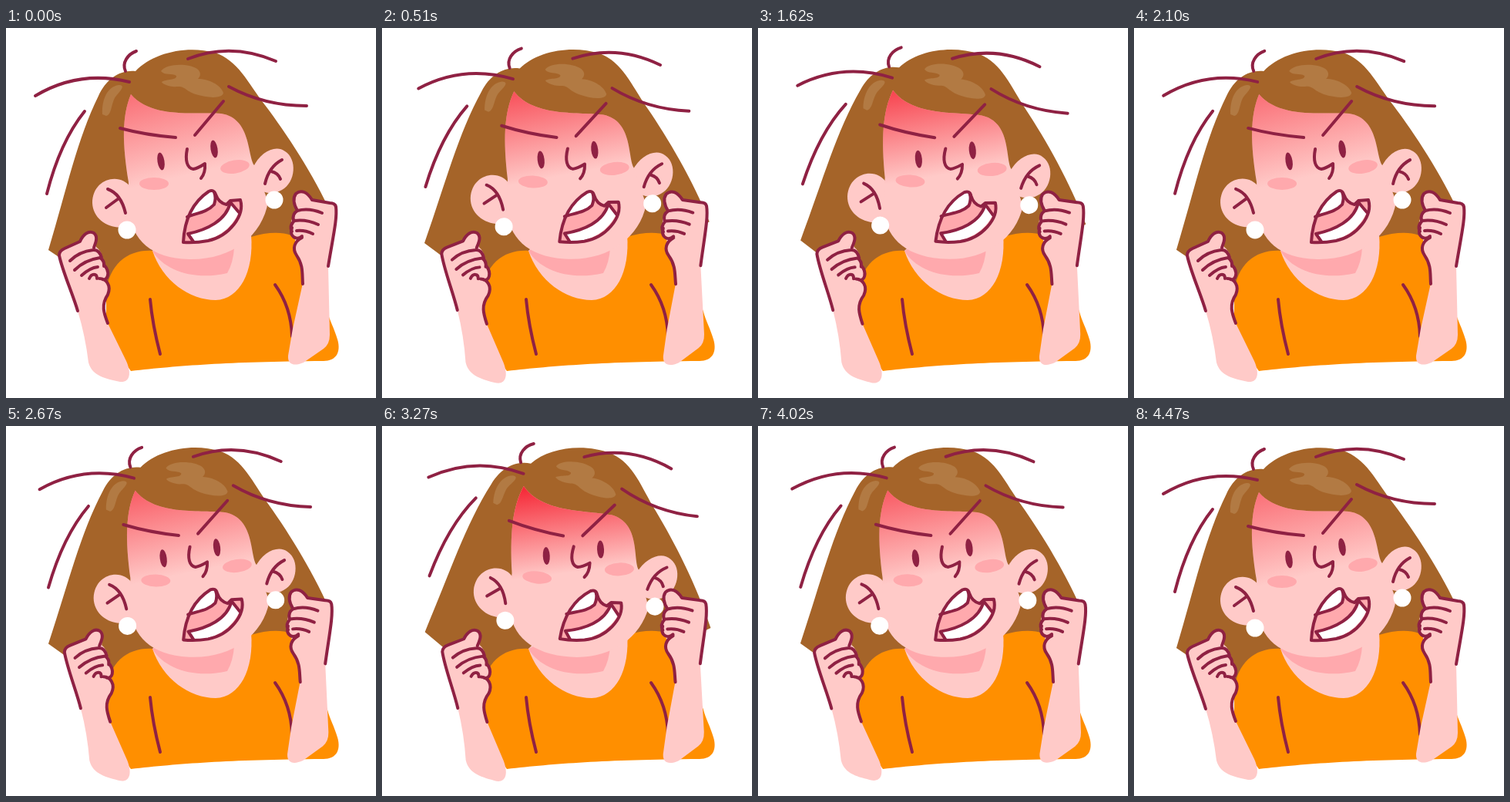
An HTML page that plays this animation: 480 px wide and 480 px high, repeating every 4500 ms.

```html
<!DOCTYPE html>
<html lang="en">
<head>
<meta charset="utf-8">
<title>Furious woman</title>
<style>
  html, body { margin: 0; width: 100%; height: 100%; overflow: hidden; background: #fff; }
  svg { display: block; width: 100%; height: 100%; }
  .line { fill: none; stroke: #8f2143; stroke-width: 4; stroke-linecap: round; stroke-linejoin: round; }
  .skin { fill: #ffcac8; }
  .hair { fill: #a56429; }
  .shine { fill: #b27a43; }
  .pink { fill: #ffa9ad; }
  .white { fill: #fff; }
  .shirt { fill: #ff8f00; }
  .eye { fill: #8f2143; }
</style>
</head>
<body>
<svg viewBox="0 0 480 480">
  <defs>
    <linearGradient id="heat" gradientUnits="userSpaceOnUse" x1="170" y1="87" x2="197" y2="200">
      <stop offset="0" stop-color="#f5202f"/>
      <stop offset="1" stop-color="#f5202f" stop-opacity="0"/>
    </linearGradient>
    <path id="face" d="M162 86C150 115 151 150 159 200V240C165 274 187 299 238 300C292 301 333 270 340 225L322 178C313 165 318 117 279 111C250 108 190 119 162 86Z"/>
    <path id="mouth" d="M230 278C231 258 236 230 263 212Q270 209 272 216Q276 227 286 229L291 224L304 223C310 243 290 270 262 276Q246 279 230 278Z"/>
  </defs>

  <g class="head">
    <path class="hair" d="M55 288C80 205 92 145 120 88C130 66 148 54 168 56C190 32 235 22 271 32C301 42 313 70 336 100C364 137 399 190 423 243L330 300L140 345Z"/>
    <path class="shine" d="M125 112C124 92 132 76 146 74C156 74 148 82 143 88C136 96 138 112 130 114ZM201 56C207 46 236 45 248 53C254 58 252 63 249 66C262 66 278 73 282 84C281 92 262 91 246 86C232 81 232 75 222 76C212 77 202 72 202 70C208 66 222 68 221 62C215 58 206 62 201 56Z"/>
  </g>

  <path class="shirt" d="M190 289C160 287 133 305 130 345V400L162 445C225 438 285 433 412 432C428 432 435 421 430 404C426 390 420 380 417 368L384 280C372 263 345 263 318 271Z"/>
  <path class="skin" d="M190 289C203 328 238 353 272 353C303 352 322 316 318 268L250 230Z"/>
  <path class="pink" d="M190 289C205 315 245 328 287 318Q295 304 296 285L230 270Z"/>
  <path class="line" d="M187 352Q190 385 200 423M349 333Q370 362 371 400"/>

  <g class="head">
    <path class="skin" d="M162 207C148 186 112 195 112 227C113 251 140 266 166 255ZM320 182C330 160 350 151 362 160C378 170 376 200 358 210C350 215 340 215 333 212Z"/>
    <use href="#face" class="skin"/>
    <use href="#face" id="flush" fill="url(#heat)"/>
    <g class="pink">
      <ellipse cx="192" cy="202" rx="19" ry="8"/>
      <ellipse cx="297" cy="180" rx="19" ry="8.5" transform="rotate(-9 297 180)"/>
    </g>
    <g class="eye">
      <ellipse cx="201" cy="173" rx="4.5" ry="11.5" transform="rotate(-9 201 173)"/>
      <ellipse cx="270" cy="157" rx="4.5" ry="11.5" transform="rotate(-9 270 157)"/>
    </g>
    <use href="#mouth" class="pink"/>
    <path class="white" d="M235 245C240 230 252 215 263 212L270 212Q273 220 270 229C261 239 248 240 235 245ZM236 267C260 262 286 250 291 226L302 239C292 262 270 277 243 277Z"/>
    <g class="line">
      <use href="#mouth"/>
      <path d="M235 245C248 240 261 239 270 229Q273 220 270 213M243 277L236 267C260 262 286 250 291 226L302 239"/>
      <path d="M235 157C232 172 235 182 243 183Q249 182 258 176Q259 188 253 195"/>
      <path id="brows" d="M148 130Q182 139 220 142M282 95L245 139"/>
      <path d="M132 209Q149 215 155 240M130 233L145 222M358 171Q341 180 336 202M344 186Q353 188 356 196"/>
      <path d="M155 56C150 45 158 34 169 30M38 88Q95 54 160 70M236 40Q292 18 350 43M289 76Q335 101 390 101M102 108Q70 148 53 215"/>
    </g>
    <g class="white">
      <circle cx="157" cy="262" r="11.5"/>
      <circle cx="348" cy="223" r="11.5"/>
    </g>
  </g>

  <g id="leftArm">
    <path class="skin" d="M93 367C87 345 73 315 69 294Q67 290 75 286L96 276C100 266 112 260 117 270L117 284C125 290 126 300 127 308Q136 316 130 328C139 341 121 355 132 383L156 432C163 448 161 460 148 459C130 455 112 452 107 434Q103 400 93 367Z"/>
    <path class="line" d="M93 367C87 346 73 315 69 295Q69 289 76 286L96 277C100 268 107 262 114 266C120 271 116 279 114 285M83 302Q95 290 113 288Q121 287 124 298M89 314Q102 301 122 298Q128 302 127 309M98 321Q109 311 119 310M108 325C111 318 118 318 118 325M127 307C136 317 132 328 125 326M121 325C130 325 137 334 132 346C123 359 127 370 132 383"/>
  </g>

  <g id="rightArm">
    <path class="skin" d="M418 309C424 272 430 247 428 232Q427 227 420 227L397 223C391 213 383 209 376 215C371 222 374 230 377 237Q370 245 370 254Q367 264 373 270C379 280 371 288 379 299Q386 312 385 331L372 390L366 425C365 437 374 439 386 434L412 416Q420 410 420 398Z"/>
    <path class="line" d="M418 309C424 272 430 247 428 232Q427 227 420 227L397 223C391 213 383 209 376 215C371 222 374 230 378 237M410 240Q393 233 378 237Q371 241 373 250M405 255Q390 248 374 250Q367 257 371 264M398 267Q388 262 377 263M371 259C367 271 377 276 384 270M384 272C374 277 371 286 377 295C386 308 384 319 385 332"/>
  </g>
</svg>
<script>
  const PERIOD = 2250;
  const byId = id => document.getElementById(id);
  const heads = document.querySelectorAll('.head');

  const ease = (x, power) => {
    x = Math.min(1, Math.max(0, x));
    return x < .5 ? (2 * x) ** power / 2 : 1 - (2 - 2 * x) ** power / 2;
  };
  const turn = (el, angle, x, y) => el.setAttribute('transform', `rotate(${angle} ${x} ${y})`);

  function draw(now) {
    const t = now % PERIOD;
    const swing = 1 - Math.abs((t + 20) % PERIOD / (PERIOD / 2) - 1);
    const tilt = ease(swing, 2.7);
    const arms = ease(t / 660, 2) - ease((t - 1400) / 700, 2);

    heads.forEach(head => turn(head, 6.2 * tilt, 248, 284));
    byId('flush').setAttribute('opacity', .52 + .43 * tilt);
    byId('brows').setAttribute('transform', `translate(0 ${2.8 * tilt})`);
    turn(byId('leftArm'), 3.1 * arms, 115, 465);
    turn(byId('rightArm'), -1.9 * arms, 390, 465);
  }

  const start = performance.now();
  (function loop() {
    draw(performance.now() - start);
    requestAnimationFrame(loop);
  })();
</script>
</body>
</html>
```
